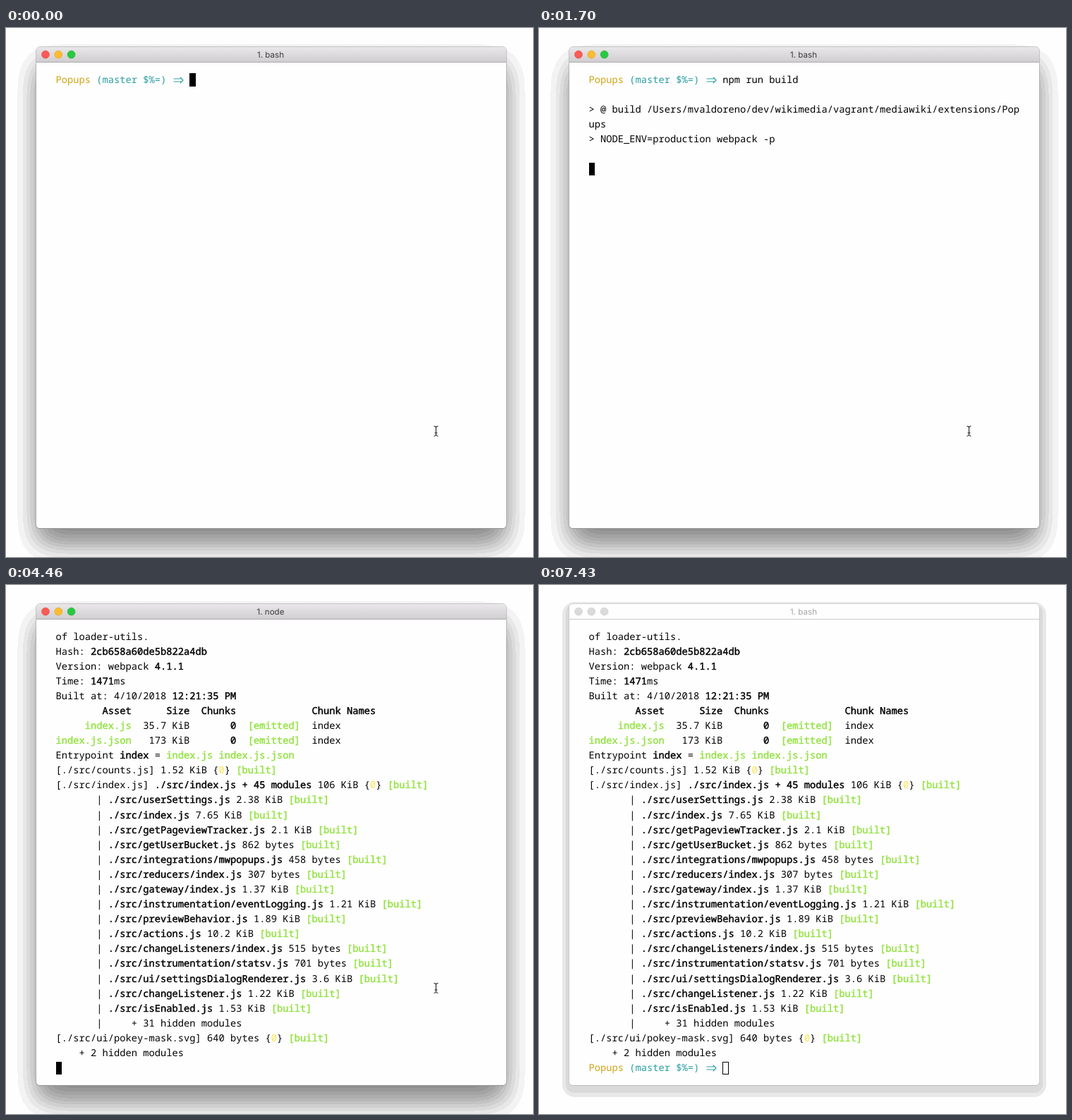
These frames come from a looping animation (747x750 px, 7520 ms). An HTML page:

```html
<!DOCTYPE html>
<html lang="en">
<head>
<meta charset="utf-8">
<title>Terminal build</title>
<style>
  html, body { margin: 0; width: 100%; height: 100%; overflow: hidden; background: #fefefe; }
  #stage { position: relative; width: 747px; height: 750px; overflow: hidden; }
  #stage > * { position: absolute; }
  #scene { left: 0; top: 0; }
  #title {
    left: 275px; top: 28px; width: 200px; text-align: center; color: #3c3c3c;
    font: 11.6px/20px Inter, Roboto, sans-serif; text-rendering: geometricPrecision;
  }
  #screen { left: 0; top: 0; }
  #screen span {
    position: absolute; white-space: pre; color: #000;
    font: 13.75px/18px "Noto Sans Mono", "DejaVu Sans Mono", monospace;
    text-rendering: geometricPrecision; font-variant-ligatures: none;
  }
  #screen .b, #screen .g { -webkit-text-stroke: .45px currentColor; }
  #screen .g { color: #93e241; }
  #screen .y { color: #fae552; }
  #screen .o { color: #d0a516; }
  #screen .t { color: #2a9ea0; }
  #screen svg { position: absolute; overflow: visible; }
  #caret { width: 8.25px; height: 18.4px; box-sizing: border-box; background: #000; }
  #mouse { left: 0; top: 0; overflow: visible; }
  .idle { display: none; }
  .inactive .idle { display: inline; }
  .inactive .live { display: none; }
  .inactive #title { color: #a6a6a6; }
  .inactive #caret { background: none; border: 1px solid #000; }
</style>
</head>
<body>
<div id="stage">
  <svg id="scene" width="747" height="750">
    <defs>
      <linearGradient id="bar" x2="0" y2="1">
        <stop offset="0" stop-color="#e9e7e9"/>
        <stop offset="1" stop-color="#d0ced0"/>
      </linearGradient>
      <filter id="bands" filterUnits="userSpaceOnUse" x="-60" y="-40" width="870" height="880">
        <feGaussianBlur stdDeviation="20"/>
        <feComponentTransfer>
          <feFuncA type="discrete" tableValues="0 .047 .094 .14 .187 .234 .28 .32 .36 .4 .435 .45"/>
        </feComponentTransfer>
      </filter>
    </defs>
    <g class="live">
      <rect x="43" y="50" width="666" height="682" filter="url(#bands)"/>
      <rect x="42.5" y="26.5" width="667" height="683.5" rx="5" fill="#969696"/>
    </g>
    <g class="idle">
      <rect x="33" y="24" width="686" height="702" rx="18" fill="#e8e8e8"/>
      <rect x="38" y="27" width="676" height="693" rx="12" fill="#dadada"/>
      <rect x="42.5" y="26.5" width="667" height="683.5" rx="5" fill="#bcbcbc"/>
    </g>
    <rect x="43" y="27" width="666" height="682" rx="4.5" fill="#fefefe"/>
    <g class="live">
      <path d="M43 48V31.5a4.5 4.5 0 0 1 4.5-4.5h657a4.5 4.5 0 0 1 4.5 4.5V48z" fill="url(#bar)"/>
      <path d="M43 48.5h666" stroke="#aeacae"/>
      <circle cx="56" cy="37.6" r="5.4" fill="#fc5b57" stroke="#e04a46" stroke-width=".7"/>
      <circle cx="74.3" cy="37.6" r="5.4" fill="#fdbc2e" stroke="#e0a233" stroke-width=".7"/>
      <circle cx="92.6" cy="37.6" r="5.4" fill="#28c941" stroke="#25ad36" stroke-width=".7"/>
    </g>
    <g class="idle">
      <path d="M43 48.5h666" stroke="#cacaca"/>
      <g fill="#dadada" stroke="#cdcdcd" stroke-width=".7">
        <circle cx="56" cy="37.6" r="5.4"/>
        <circle cx="74.3" cy="37.6" r="5.4"/>
        <circle cx="92.6" cy="37.6" r="5.4"/>
      </g>
    </g>
  </svg>
  <div id="title"></div>
  <div id="screen"></div>
  <div id="caret"></div>
  <svg id="mouse" width="1" height="1">
    <path d="M-3 -7Q-.3 -7 0 -5Q.3 -7 3 -7M0 -5.5V5.5M-3 7Q-.3 7 0 5Q.3 7 3 7M-2 2.5H2"
      fill="none" stroke="#222" stroke-width="1.1"/>
  </svg>
</div>
<script>
const LOOP = 7520, CELL = 8.25, LEFT = 70.6, PITCH = 21.09, CARET_TOP = 64.3, TEXT_TOP = 64.5;
const $ = id => document.getElementById(id);
const colX = col => LEFT + col * CELL;
const textY = row => Math.round(TEXT_TOP + row * PITCH);
const caretY = row => CARET_TOP + row * PITCH;

// "~" plus a letter sets the style of the text after it; "~a" draws the prompt arrow.
const prompt = "~oPopups ~t(master $%=) ~a  ~n ";
const command = prompt + "npm run build";
const built = "~g[built]~n";
const chunk = `{~y0~n} ${built}`;
const mod = line => {
  const [path, ...size] = line.split(" ");
  return `       | ~b./src/${path}.js~n ${size.join(" ")} ${built}`;
};

const started = [
  command, "",
  "> @ build /Users/mvaldoreno/dev/wikimedia/vagrant/mediawiki/extensions/Pop",
  "ups",
  "> NODE_ENV=production webpack -p", ""
];
const warned = [
  ...started,
  "(node:26198) DeprecationWarning: loaderUtils.parseQuery() received a non-s",
  "tring value which can be problematic, see https://github.com/webpack/loade",
  "r-utils/issues/56",
  "parseQuery() will be replaced with getOptions() in the next major version",
  "of loader-utils."
];
const report = [
  "of loader-utils.",
  "Hash: ~b2cb658a60de5b822a4db",
  "Version: webpack ~b4.1.1",
  "Time: ~b1471~nms",
  "Built at: 4/10/2018 ~b12:21:35 PM",
  "~b        Asset      Size  Chunks             Chunk Names",
  "     ~gindex.js~n  35.7 KiB       ~b0~n  ~g[emitted]~n  index",
  "~gindex.js.json~n   173 KiB       ~b0~n  ~g[emitted]~n  index",
  "Entrypoint ~bindex~n = ~gindex.js index.js.json",
  "[./src/counts.js] 1.52 KiB " + chunk,
  "[./src/index.js] ~b./src/index.js + 45 modules~n 106 KiB " + chunk,
  ...[
    "userSettings 2.38 KiB", "index 7.65 KiB", "getPageviewTracker 2.1 KiB",
    "getUserBucket 862 bytes", "integrations/mwpopups 458 bytes",
    "reducers/index 307 bytes", "gateway/index 1.37 KiB",
    "instrumentation/eventLogging 1.21 KiB", "previewBehavior 1.89 KiB",
    "actions 10.2 KiB", "changeListeners/index 515 bytes",
    "instrumentation/statsv 701 bytes", "ui/settingsDialogRenderer 3.6 KiB",
    "changeListener 1.22 KiB", "isEnabled 1.53 KiB"
  ].map(mod),
  "       |     + 31 hidden modules",
  "[./src/ui/pokey-mask.svg] 640 bytes " + chunk,
  "    + 2 hidden modules"
];
const done = [...report, prompt];

// Each step keeps the values of the one before unless it sets its own.
const steps = [
  { at: 0, lines: [prompt], caret: [23, 0], title: "bash", mouse: [609.5, 571.5], inactive: false },
  { at: 660, lines: [command], caret: [36, 0] },
  { at: 1280, caret: [0, 1] },
  { at: 1700, lines: started, caret: [0, 6] },
  { at: 2180, title: "node" },
  { at: 3740, lines: warned, caret: [0, 11] },
  { at: 4460, lines: report, caret: [0, 29] },
  { at: 4630, lines: done, caret: [23, 29] },
  { at: 5050, title: "bash" },
  { at: 6430, mouse: [626.5, 602.5] },
  { at: 6485, mouse: [665.5, 686.5] },
  { at: 6540, mouse: null },
  { at: 7430, inactive: true }
];
steps.forEach((step, i) => { steps[i] = { ...steps[i - 1], ...step }; });

function lineHtml(line, row) {
  let col = 0, html = "";
  for (const part of ("~n" + line).split("~").slice(1)) {
    const style = part[0], text = part.slice(1);
    const place = `style="left:${colX(col)}px;top:${textY(row)}px"`;
    if (style === "a") {
      html += `<svg ${place} width="17" height="18"><path d="M1.5 7H13.5M1.5 11H13.5M10.8 4.7L15 9L10.8 13.3"
        fill="none" stroke="#2a9ea0" stroke-width="1.2"/></svg>`;
    } else if (text) {
      html += `<span class="${style}" ${place}>${text.replace(/>/g, "&gt;")}</span>`;
    }
    col += text.length;
  }
  return html;
}

let shown = null;
function show(step) {
  if (!shown || shown.lines !== step.lines) $("screen").innerHTML = step.lines.map(lineHtml).join("");
  $("title").textContent = "1. " + step.title;
  $("caret").style.left = colX(step.caret[0]) + "px";
  $("caret").style.top = caretY(step.caret[1]) + "px";
  $("mouse").style.display = step.mouse ? "" : "none";
  if (step.mouse) $("mouse").style.transform = `translate(${step.mouse[0]}px, ${step.mouse[1]}px)`;
  $("stage").classList.toggle("inactive", step.inactive);
  shown = step;
}

const start = performance.now();
function tick() {
  const time = (performance.now() - start) % LOOP;
  const step = steps.findLast(s => s.at <= time) || steps[0];
  if (step !== shown) show(step);
  requestAnimationFrame(tick);
}
tick();
</script>
</body>
</html>
```
